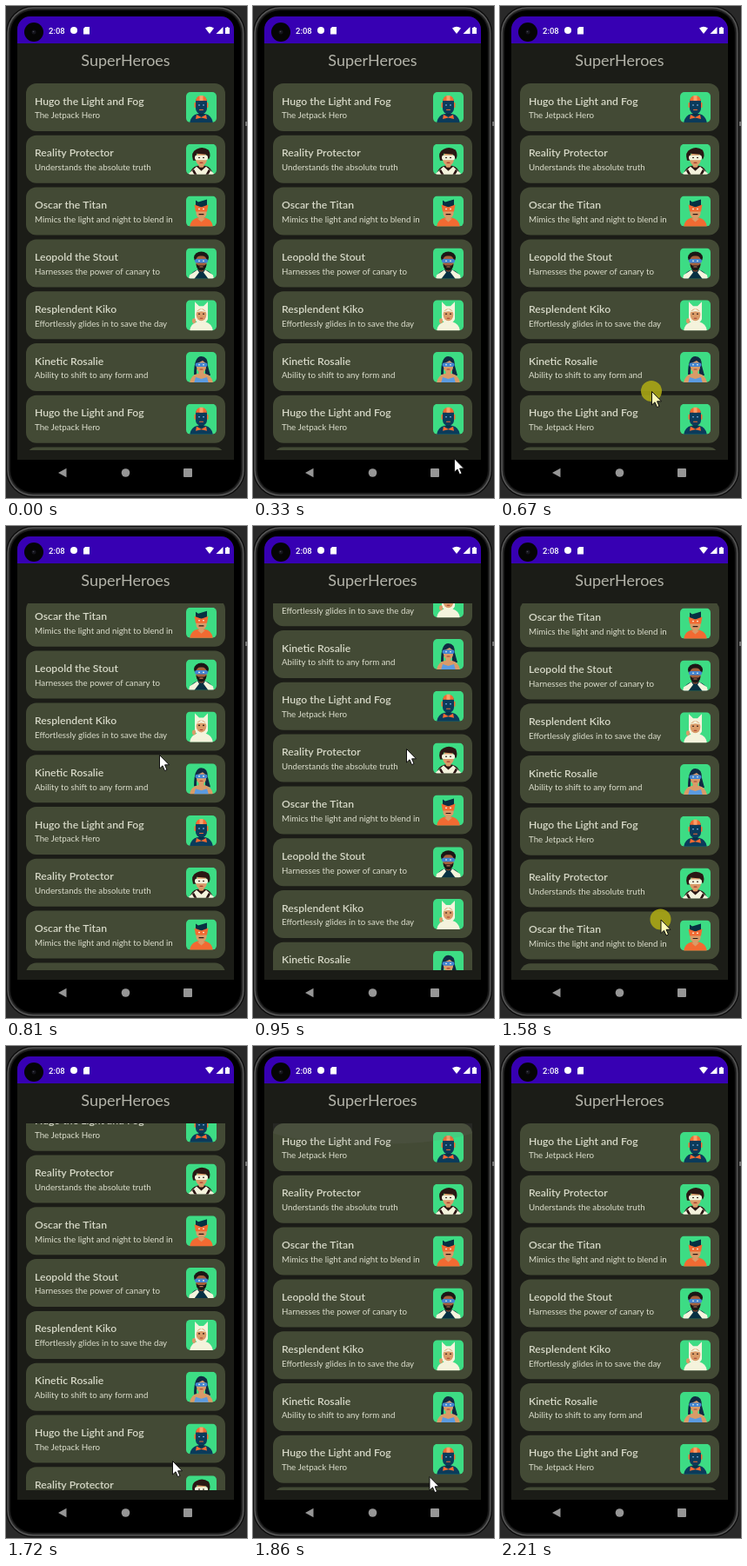
Recreate the animation shown at these times as an HTML page with a canvas. Size 277 by 566 pixels, loop 2810 ms.

```html
<!DOCTYPE html>
<html lang="en">
<head>
<meta charset="utf-8">
<title>Hero list</title>
<style>
html, body { margin: 0; width: 100%; height: 100%; overflow: hidden; background: #292929; }
canvas { display: block; width: 277px; height: 566px; }
</style>
</head>
<body>
<canvas id="stage"></canvas>
<script>
const W = 277, H = 566, LOOP = 2810;
const canvas = document.getElementById('stage');
const ctx = canvas.getContext('2d');
const dpr = window.devicePixelRatio || 1;
canvas.width = W * dpr;
canvas.height = H * dpr;

const FONT = 'Lato, "Open Sans", sans-serif';
const LIST = { x: 23, y: 89, w: 229, h: 422 };
const PITCH = 59.8, CARD_H = 55, COUNT = 12;
const MAX = COUNT * PITCH - LIST.h;
const NAVY = '#073042', BLUE = '#4285d4', ORANGE = '#f26a32', CREAM = '#f4f3dc', TAN = '#d99b68', HAIR = '#2b1714';

// time, scroll offset
const SCROLL = [[670, 0], [740, 42], [810, 124.8], [880, 208], [950, 268], [1020, 290], [1090, MAX],
  [1300, MAX], [1370, 283], [1440, 245], [1510, 188], [1580, 124], [1650, 66], [1720, 23.3], [1790, 0]];
// time, pointer x, pointer y
const POINTER = [[190, 256, 552], [460, 204, 486], [600, 175, 444], [670, 174, 443], [740, 174, 362], [810, 176, 263],
  [950, 176, 256], [1300, 176, 257], [1440, 178, 327], [1580, 184.5, 452.5], [1650, 189, 472], [1720, 191, 477],
  [1790, 194, 482], [1930, 211, 508], [2140, 247, 553], [2210, 262, 574]];

function track(keys, t, i = 1) {
  if (t <= keys[0][0]) return keys[0][i];
  for (let k = 1; k < keys.length; k++) {
    const a = keys[k - 1], b = keys[k];
    if (t <= b[0]) return a[i] + (b[i] - a[i]) * (t - a[0]) / (b[0] - a[0]);
  }
  return keys[keys.length - 1][i];
}

function box(x, y, w, h, r, color) {
  ctx.fillStyle = color;
  ctx.beginPath();
  ctx.roundRect(x, y, w, h, r);
  ctx.fill();
}

function oval(x, y, rx, ry, color) {
  ctx.fillStyle = color;
  ctx.beginPath();
  ctx.ellipse(x, y, rx, ry, 0, 0, Math.PI * 2);
  ctx.fill();
}

function shape(d, color) {
  ctx.fillStyle = color;
  ctx.fill(new Path2D(d));
}

function text(s, x, y, font, color, align = 'left') {
  ctx.font = font;
  ctx.fillStyle = color;
  ctx.textAlign = align;
  ctx.fillText(s, x, y);
}

function bust(color, skin) {
  shape('M4 36Q5 27 13 25L22 25Q30 27 31 36Z', color);
  box(14.5, 20, 6, 7, 2, skin);
}

function eyes(y, color) {
  oval(15, y, 1, .8, color);
  oval(20, y, 1, .8, color);
}

function drawJet() {
  bust('#0b3b5b', NAVY);
  box(9.5, 12, 2.5, 6, 1, ORANGE);
  box(23, 12, 2.5, 6, 1, ORANGE);
  box(11, 5, 13, 20, 6, '#0b3b5b');
  shape('M11 10Q12 4 17.5 4Q23 4 24 10Z', ORANGE);
  shape('M15.5 4H19.5V10H15.5Z', '#f9a06b');
  eyes(15, '#7fb4e8');
  box(15, 20, 5, 1, .5, ORANGE);
  shape('M12 26L17.5 29L23 26L24 31L17.5 29.5L11 31Z', ORANGE);
}

function drawTruth() {
  bust(HAIR, TAN);
  shape('M3 34L12 26L17.5 31L23 26L32 34L31 36H4Z', CREAM);
  shape('M9 29L13 36H10L7 31Z M26 29L22 36H25L28 31Z', HAIR);
  oval(17.5, 17, 6.5, 8, TAN);
  shape('M8 19Q5 9 12 6Q19 2 26 7Q29 13 26 18L23 12L12 11L11 19Z', HAIR);
  box(10, 13, 15, 5.5, 2.2, CREAM);
  eyes(15.7, HAIR);
  box(15.5, 21, 4, 1.2, .6, '#a83a2d');
}

function drawMask() {
  bust(ORANGE, TAN);
  box(11.5, 8, 12, 17, 5, TAN);
  shape('M11 13L11 5L14 7L24 4L24 13Z', NAVY);
  shape('M9.5 10L17.5 13L25.5 10L24 18H11Z', ORANGE);
  eyes(15, CREAM);
  box(14.5, 20.5, 6, 1.1, .5, HAIR);
  shape('M13 26L17.5 30L22 26Z', TAN);
}

function drawBrave() {
  bust(NAVY, '#8b4b2e');
  shape('M4 31L13 25L15 28L9 36H3Z M31 31L22 25L20 28L26 36H32Z', CREAM);
  oval(17.5, 11, 8.5, 7, '#1c1716');
  box(11.5, 9, 12, 15, 5, '#a4603c');
  shape('M11.5 18L14 20H21L23.5 18Q23 26 17.5 26Q12 26 11.5 18Z', '#1c1716');
  box(10, 12.5, 15, 4.5, 2, BLUE);
  eyes(14.8, CREAM);
  box(15.3, 21, 4.4, 1.2, .6, '#c7785b');
}

function drawCat() {
  bust(CREAM, CREAM);
  shape('M10 14L10 2L15 7H20L25 2L25 14V22Q23 27 17.5 27Q12 27 10 22Z', CREAM);
  oval(17.5, 17, 5.8, 7, TAN);
  shape('M11.5 14L17.5 10L23.5 14L17.5 13Z', CREAM);
  eyes(16, HAIR);
  box(15.7, 20.5, 3.6, 1, .5, '#a83a2d');
  oval(9, 24, 2, 3, TAN);
}

function drawShift() {
  shape('M9 26Q9 5 17.5 5Q25 5 25 16L28 27H22V20H12V26Z', '#102b43');
  bust(TAN, TAN);
  shape('M9 36L11 29L17.5 31L24 29L26 36Z', '#5b9be0');
  box(12, 9, 11, 14, 5.2, TAN);
  shape('M11 14Q12 6 18 7Q24 7 24 14L19 10Z', '#102b43');
  box(10.5, 12.5, 14, 4.5, 2, BLUE);
  eyes(14.7, CREAM);
  box(15.5, 19.5, 4, 1.1, .5, '#a83a2d');
}

const HEROES = [
  ['Hugo the Light and Fog', 'The Jetpack Hero', drawJet],
  ['Reality Protector', 'Understands the absolute truth', drawTruth],
  ['Oscar the Titan', 'Mimics the light and night to blend in', drawMask],
  ['Leopold the Stout', 'Harnesses the power of canary to', drawBrave],
  ['Resplendent Kiko', 'Effortlessly glides in to save the day', drawCat],
  ['Kinetic Rosalie', 'Ability to shift to any form and', drawShift]
];

function drawCard([name, note, face], y) {
  box(LIST.x, y, LIST.w, CARD_H, 12, '#434a35');
  text(name, 33, y + 24.5, '600 12.2px ' + FONT, '#d8dac9');
  text(note, 33, y + 40.3, '400 9.75px ' + FONT, '#dcdecd');
  ctx.save();
  ctx.translate(207, y + 10);
  ctx.beginPath();
  ctx.roundRect(0, 0, 35, 35, 5);
  ctx.clip();
  box(0, 0, 35, 35, 0, '#3ddc84');
  face();
  ctx.restore();
}

// Faint arc at a list edge, fading after the scroll hits it.
function drawGlow(y, age) {
  if (age < 0 || age > 420) return;
  oval(137.5, y, 130, 24, `rgba(110,110,110,${.16 * (1 - age / 420)})`);
}

function drawList(t) {
  const scroll = track(SCROLL, t);
  ctx.save();
  ctx.beginPath();
  ctx.rect(LIST.x, LIST.y, LIST.w, LIST.h);
  ctx.clip();
  for (let i = 0; i < COUNT; i++) {
    const y = LIST.y + i * PITCH - scroll;
    if (y > LIST.y - PITCH && y < LIST.y + LIST.h) drawCard(HEROES[i % HEROES.length], y);
  }
  if (scroll === MAX) drawGlow(LIST.y + LIST.h, t - 1090);
  if (scroll === 0) drawGlow(LIST.y, t - 1790);
  ctx.restore();
}

function drawPhone() {
  box(0, 0, W, H, 0, '#292929');
  box(275, 133, 2, 5, 0, '#777');
  const rim = ['#0c0c0c', '#5c5c5c', '#303030', '#161616', '#000'];
  rim.forEach((color, i) => {
    const inset = i * 1.3;
    box(inset, inset, 275 - 2 * inset, 565 - 2 * inset, 31 - inset, color);
  });
  box(13, 12, 249, 510, [15, 15, 0, 0], '#1b1c17');
  box(13, 12, 249, 31, [15, 15, 0, 0], '#3700b3');
}

function drawBars() {
  oval(32, 30, 11, 11, '#050505');
  oval(32, 30, 2.5, 2.5, '#15151c');
  oval(31.5, 29.5, .8, .8, '#4a4a55');
  text('2:08', 49, 31.5, '500 9.5px Roboto, sans-serif', '#fff');
  oval(78, 28, 4, 4, '#fff');
  shape('M91 24H96V32.5H89V26Z', '#fff');
  shape('M229 25.5Q234 22 239 25.5L234 32Z', '#fff');
  shape('M249.5 24V32H241.5Z', '#fff');
  shape('M252 25H253.5V24H255.5V25H257V32H252Z', '#fff');
  text('SuperHeroes', 137.5, 69, '400 18px ' + FONT, '#b4b4aa', 'center');
  shape('M60 537L69.5 531.8V542.2Z', '#969696');
  oval(137.5, 537, 4.8, 4.8, '#969696');
  box(204, 532, 10, 10, 1, '#969696');
}

function drawPointer(t) {
  if (t < 190 || t >= 2210) return;
  const x = track(POINTER, t), y = track(POINTER, t, 2);
  const down = (t >= 600 && t < 810) || (t >= 1300 && t < 1650);
  if (down) oval(x, y, 12, 12, 'rgba(172,168,20,.88)');
  ctx.save();
  ctx.translate(x, y);
  const arrow = new Path2D('M.5 .5V16L4 12.8L6.5 18.6L9 17.5L6.6 11.8H11.5Z');
  ctx.fillStyle = down ? '#fdfbb8' : '#fff';
  ctx.fill(arrow);
  ctx.strokeStyle = '#111';
  ctx.lineWidth = 1;
  ctx.stroke(arrow);
  ctx.restore();
}

function step(t) {
  return t < 190 ? 0 : Math.max(190, 740 + 70 * Math.floor((t - 740) / 70));
}

const start = performance.now();
function draw() {
  const t = step((performance.now() - start) % LOOP);
  ctx.setTransform(dpr, 0, 0, dpr, 0, 0);
  drawPhone();
  drawList(t);
  drawBars();
  drawPointer(t);
  requestAnimationFrame(draw);
}
draw();
</script>
</body>
</html>
```
